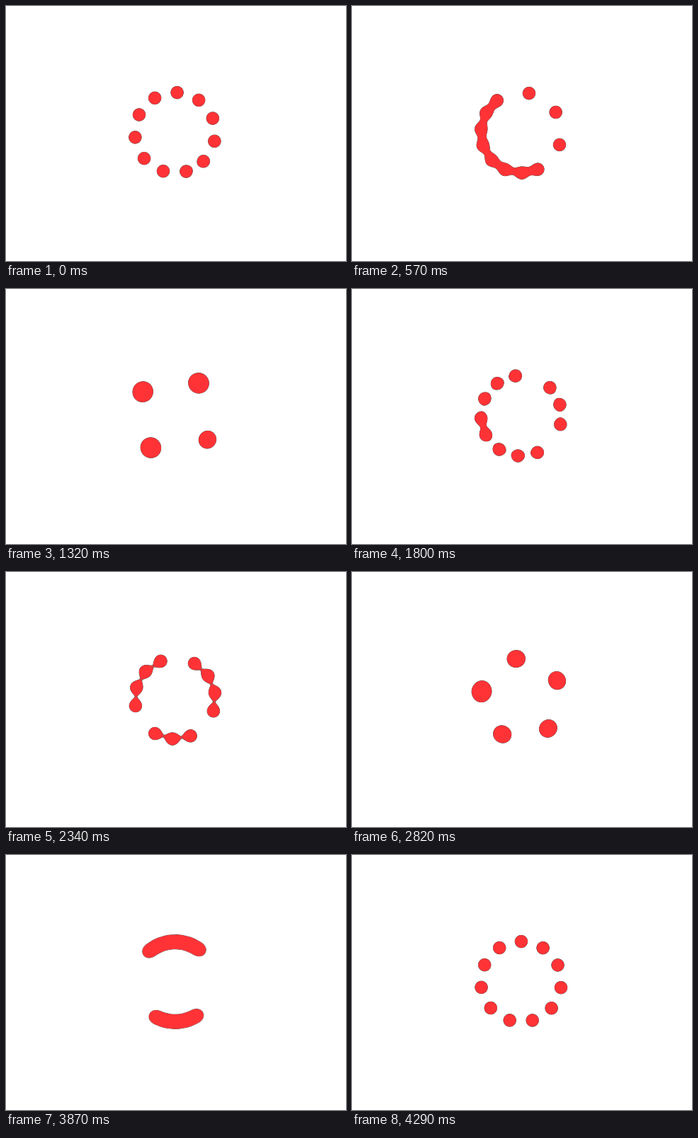
An HTML page without scripts that plays this animation: 480 by 360 pixels, repeating every 4.32 s.

```html
<!DOCTYPE html>
<html lang="en">
<head>
<meta charset="utf-8">
<title>Gooey ring loader</title>
<style>
  @property --gap {
    syntax: "<angle>";
    inherits: true;
    initial-value: 33.1deg;
  }
  html, body {
    margin: 0;
    width: 100%;
    height: 100%;
    overflow: hidden;
    background: #fff;
  }
  svg { display: block; width: 480px; height: 360px; }

  /* Dot n sits n gaps past the anchor angle; only the gap is animated. */
  .ring { animation: spread 4320ms linear infinite; }
  .ring circle {
    fill: url(#ball);
    transform: rotate(calc(131deg + var(--n) * var(--gap)));
  }
  @keyframes spread {
    0%      { --gap: 33.1deg;   animation-timing-function: cubic-bezier(.333, .179, .667, .464); }
    13.194% { --gap: 48.02deg;  animation-timing-function: cubic-bezier(.333, .26, .667, .641); }
    25%     { --gap: 75.5deg;   animation-timing-function: cubic-bezier(.333, .336, .667, .675); }
    30.556% { --gap: 89.2deg;   animation-timing-function: cubic-bezier(.333, .424, .667, .72); }
    41.667% { --gap: 110.47deg; animation-timing-function: cubic-bezier(.333, .365, .667, .645); }
    65.278% { --gap: 144.87deg; animation-timing-function: cubic-bezier(.333, .304, .667, .629); }
    79.167% { --gap: 168.64deg; animation-timing-function: cubic-bezier(.333, .332, .667, .713); }
    87.847% { --gap: 185.2deg;  animation-timing-function: cubic-bezier(.333, .578, .667, .833); }
    100%    { --gap: 196.7deg; }
  }
</style>
</head>
<body>
<svg viewBox="0 0 480 360" role="img" aria-label="Loading">
  <defs>
    <!-- Soft falloff: stacked dots add up and swell once thresholded -->
    <radialGradient id="ball" gradientUnits="userSpaceOnUse" cx="0" cy="-56.8" r="22">
      <stop offset="0" stop-color="#ff3336"/>
      <stop offset=".432" stop-color="#ff3336" stop-opacity=".46"/>
      <stop offset=".573" stop-color="#ff3336" stop-opacity=".268"/>
      <stop offset=".691" stop-color="#ff3336" stop-opacity=".18"/>
      <stop offset=".795" stop-color="#ff3336" stop-opacity=".09"/>
      <stop offset=".93" stop-color="#ff3336" stop-opacity="0"/>
    </radialGradient>
    <!-- Threshold, then blur and threshold again to round the necks -->
    <filter id="goo" filterUnits="userSpaceOnUse" x="-120" y="-120" width="240" height="240" color-interpolation-filters="sRGB">
      <feColorMatrix values="0 0 0 0 1  0 0 0 0 .2  0 0 0 0 .212  0 0 0 16 -6.86"/>
      <feGaussianBlur stdDeviation="2.6" result="soft"/>
      <feColorMatrix in="soft" result="rim" values="0 0 0 0 .4  0 0 0 0 .36  0 0 0 0 .36  0 0 0 9 -3.8"/>
      <feColorMatrix in="soft" result="body" values="0 0 0 0 1  0 0 0 0 .2  0 0 0 0 .212  0 0 0 9 -4.4"/>
      <feMerge>
        <feMergeNode in="rim"/>
        <feMergeNode in="body"/>
      </feMerge>
    </filter>
  </defs>
  <g transform="translate(238.8 178.9)">
    <g class="ring" filter="url(#goo)">
      <circle cy="-56.8" r="22" style="--n:1"/>
      <circle cy="-56.8" r="22" style="--n:2"/>
      <circle cy="-56.8" r="22" style="--n:3"/>
      <circle cy="-56.8" r="22" style="--n:4"/>
      <circle cy="-56.8" r="22" style="--n:5"/>
      <circle cy="-56.8" r="22" style="--n:6"/>
      <circle cy="-56.8" r="22" style="--n:7"/>
      <circle cy="-56.8" r="22" style="--n:8"/>
      <circle cy="-56.8" r="22" style="--n:9"/>
      <circle cy="-56.8" r="22" style="--n:10"/>
      <circle cy="-56.8" r="22" style="--n:11"/>
    </g>
  </g>
</svg>
</body>
</html>
```
